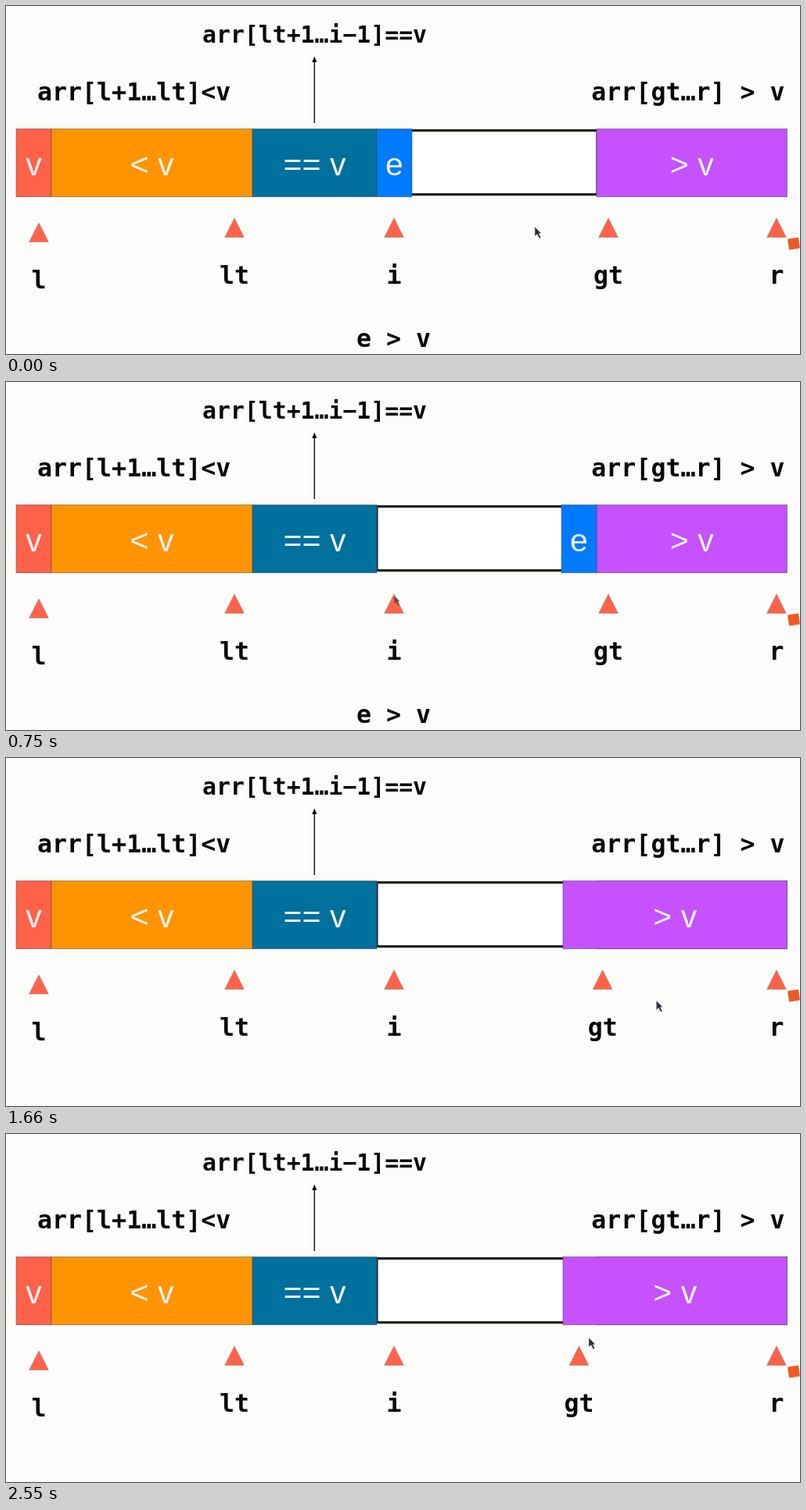
Recreate the animation shown at these times as an HTML page. Size 1015 by 446 pixels, loop 5.62 s.

```html
<!DOCTYPE html>
<html lang="en">
<head>
<meta charset="utf-8">
<title>Three-way partition</title>
<style>
  html, body { margin: 0; width: 100%; height: 100%; overflow: hidden; background: #fcfcfa; }
  svg { display: block; width: 100vw; height: 100vh; }
  .code { font: bold 31.6px "DejaVu Sans Mono", monospace; fill: #080808; white-space: pre; }
  .small { font-size: 29.8px; }
  .mid { text-anchor: middle; }
  .cell text { font: 41px "Liberation Sans", Arial, sans-serif; fill: #f0f4f6; text-anchor: middle; }
  .cell rect { stroke: #444; stroke-opacity: .5; }
  .tri { fill: #ff6249; stroke: #b09088; stroke-width: .7; }
</style>
</head>
<body>
<svg viewBox="0 0 1015 446" preserveAspectRatio="none">
  <defs>
    <path id="arrow" d="M0 0V12L3 9.6L5.6 14.8L7.8 13.7L5.2 8.8L8.2 8.4Z"/>
  </defs>
  <rect width="1015" height="446" fill="#fcfcfa"/>

  <rect x="474" y="159.5" width="282" height="82" fill="#fff" stroke="#24241f" stroke-width="3.2"/>
  <g id="bar"></g>
  <g id="wide"></g>

  <path d="M394.3 150V69" stroke="#111" stroke-width="1.4"/>
  <path d="M394.3 64.5L397.4 72H391.2Z" fill="#111"/>
  <text class="code small" x="251" y="47">arr[lt+1…i−1]==v</text>
  <text class="code" x="40" y="120.5">arr[l+1…lt]&lt;v</text>
  <text class="code" x="748.3" y="120.5">arr[gt…r] &gt; v</text>
  <text class="code" id="test" x="448" y="437">e &gt; v</text>

  <g id="marks"></g>
  <rect x="-7" y="-7" width="14" height="14" rx="1.5" transform="translate(1007 304.5) rotate(-8)" fill="#ee5a24"/>
  <g id="e"></g>
  <use id="rest" href="#arrow" transform="translate(496.5 274) scale(.85)" fill="#57423f"/>
  <use id="cursor" href="#arrow" fill="#2a2e35" stroke="#d5d8da" stroke-width=".6"/>
</svg>
<script>
const $ = id => document.getElementById(id);
const LOOP = 5620;

const cell = (x, w, color, text, tx = x + w / 2) =>
  `<g class="cell"><rect x="${x}" y="157.5" width="${w}" height="87" fill="${color}"/>
   <text x="${tx}" y="216.8">${text}</text></g>`;

const mark = (name, x, y = 271) =>
  `<g id="m-${name}" transform="translate(${x} ${y})">
     <path class="tri" d="M0 .8L12.4 25.4H-12.4Z"/>
     <text class="code mid" y="85">${name}</text></g>`;

$('bar').innerHTML =
  cell(13, 45, '#ff6249', 'v') +
  cell(58, 257, '#ff9400', '&lt; v') +
  cell(315, 159, '#00709c', '== v') +
  cell(755, 243.5, '#c551ff', '&gt; v');
$('wide').innerHTML = cell(712, 286.5, '#c551ff', '&gt; v');
$('e').innerHTML = cell(474, 45, '#007bff', 'e');
$('marks').innerHTML = mark('l', 42, 277) + mark('lt', 292) + mark('i', 496) + mark('gt', 770) + mark('r', 985);

const span = (t, a, b) => Math.min(1, Math.max(0, (t - a) / (b - a)));
const smooth = p => p * p * (3 - 2 * p);
const easeOut = p => 1 - (1 - p) ** 1.47;
const bow = p => Math.sin(Math.PI * p);

function bezier(p, a, b, c, d) {
  const q = 1 - p;
  return q * q * q * a + 3 * q * q * p * b + 3 * q * p * p * c + p * p * p * d;
}

const move = (id, x, y) => $(id).setAttribute('transform', `translate(${x.toFixed(2)} ${y.toFixed(2)})`);
const fade = (id, v) => $(id).setAttribute('opacity', v);

// The pointer drifts right, comes back down, then swings under "gt".
function movePointer(t) {
  const up = span(t, 460, 580), right = span(t, 580, 1370);
  const back = smooth(span(t, 1370, 1860)), swing = span(t, 1980, 2480);
  move('cursor',
    676 + 14 * up + 202 * right - 95 * back - 52 * swing - 80 * bow(swing),
    283 - 18 * up + 3 * right + 67 * back - 74 * swing + 80 * bow(swing));
  fade('cursor', t >= 640 && t < 1170 ? 0 : 1);
}

function draw(t) {
  const hop = easeOut(span(t, 100, 740));
  move('e', bezier(hop, 0, -50, 288, 236), bezier(hop, 0, -210, -210, 0));

  const merge = smooth(span(t, 820, 1170));
  fade('wide', merge);
  for (const id of ['e', 'test']) fade(id, 1 - merge);

  move('m-gt', 770 - 37.5 * smooth(span(t, 1400, 2320)), 271);
  movePointer(t);
  fade('rest', t >= 140 && t < 1070 ? .85 : 0);
}

const start = performance.now();
function frame() {
  draw(Math.max(0, performance.now() - start) % LOOP);
  requestAnimationFrame(frame);
}
frame();
</script>
</body>
</html>
```
